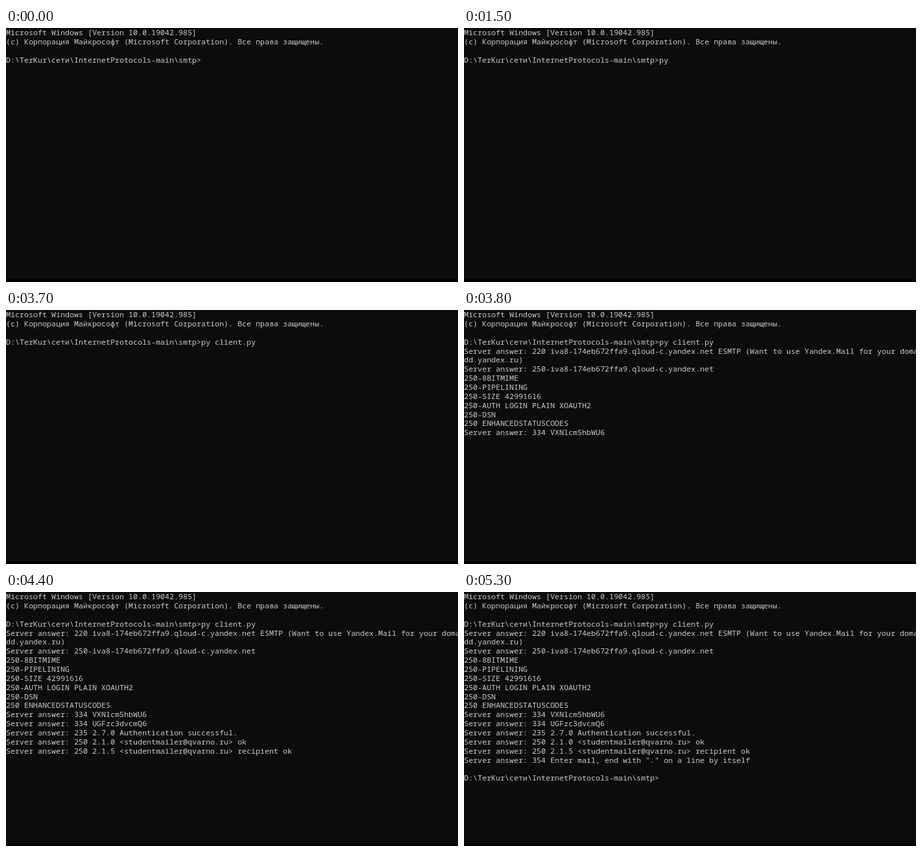
An HTML page with a canvas that plays this animation: 690x388 px, repeating every 5900 ms.

```html
<!DOCTYPE html>
<html lang="ru">
<head>
<meta charset="utf-8">
<title>SMTP client</title>
<style>
html, body { margin: 0; width: 100%; height: 100%; overflow: hidden; background: #0c0c0c; }
canvas { display: block; }
</style>
</head>
<body>
<canvas id="screen" width="690" height="388"></canvas>
<script>
const ctx = document.getElementById('screen').getContext('2d');
const LOOP = 5900;
const CELL_W = 8, CELL_H = 16, BASELINE = 12.8;
const SCALE = 0.8662;

const prompt = 'D:\\TerKur\\сети\\InternetProtocols-main\\smtp>';
const command = 'py client.py';
const host = 'iva8-174eb672ffa9.qloud-c.yandex.net';
const mail = '<studentmailer@qvarno.ru>';
const answer = text => 'Server answer: ' + text;

const header = [
  'Microsoft Windows [Version 10.0.19042.985]',
  '(c) Корпорация Майкрософт (Microsoft Corporation). Все права защищены.',
  ''
];

// Lines printed by the client, each batch from its own moment on
const output = [
  [3800, [
    answer('220 ' + host + ' ESMTP (Want to use Yandex.Mail for your doma'),
    'dd.yandex.ru)',
    answer('250-' + host),
    '250-8BITMIME',
    '250-PIPELINING',
    '250-SIZE 42991616',
    '250-AUTH LOGIN PLAIN XOAUTH2',
    '250-DSN',
    '250 ENHANCEDSTATUSCODES',
    answer('334 VXNlcm5hbWU6')
  ]],
  [3900, [
    answer('334 UGFzc3dvcmQ6'),
    answer('235 2.7.0 Authentication successful.')
  ]],
  [4400, [
    answer('250 2.1.0 ' + mail + ' ok'),
    answer('250 2.1.5 ' + mail + ' recipient ok')
  ]],
  [4500, [answer('354 Enter mail, end with "." on a line by itself'), '']],
  [4600, [prompt]]
];

// Time and number of typed characters
const typing = [[0, 0], [1200, 1], [1500, 2], [2200, 3], [2400, 4], [2800, 12]];

// Spans in which the cursor is lit
const lit = [[1000, 1500], [2100, 2600], [2800, 3700], [4600, 5300]];

const typedAt = t => typing.filter(([at]) => t >= at).pop()[1];

function linesAt(t) {
  const lines = [...header, prompt + command.slice(0, typedAt(t))];
  if (t >= 3300 && t < 3800) lines.push('');
  for (const [at, batch] of output) if (t >= at) lines.push(...batch);
  return lines;
}

function drawLine(text, row) {
  [...text].forEach((ch, col) => {
    if (ch !== ' ') ctx.fillText(ch, col * CELL_W, row * CELL_H + BASELINE);
  });
}

function draw(t) {
  const lines = linesAt(t);
  ctx.setTransform(1, 0, 0, 1, 0, 0);
  ctx.fillStyle = '#0c0c0c';
  ctx.fillRect(0, 0, 690, 388);
  ctx.fillStyle = '#000';
  ctx.fillRect(0, 384, 690, 4);

  ctx.scale(SCALE, SCALE);
  ctx.font = '13.33px "Noto Sans Mono", "DejaVu Sans Mono", monospace';
  ctx.fillStyle = '#ccc';
  lines.forEach(drawLine);

  if (lit.some(([on, off]) => t >= on && t < off)) {
    const row = lines.length - 1;
    ctx.fillStyle = '#f2f2f2';
    ctx.fillRect(lines[row].length * CELL_W, row * CELL_H + 12, CELL_W, 4);
  }
}

const start = performance.now();
function tick() {
  draw((performance.now() - start) % LOOP);
  requestAnimationFrame(tick);
}
tick();
</script>
</body>
</html>
```
